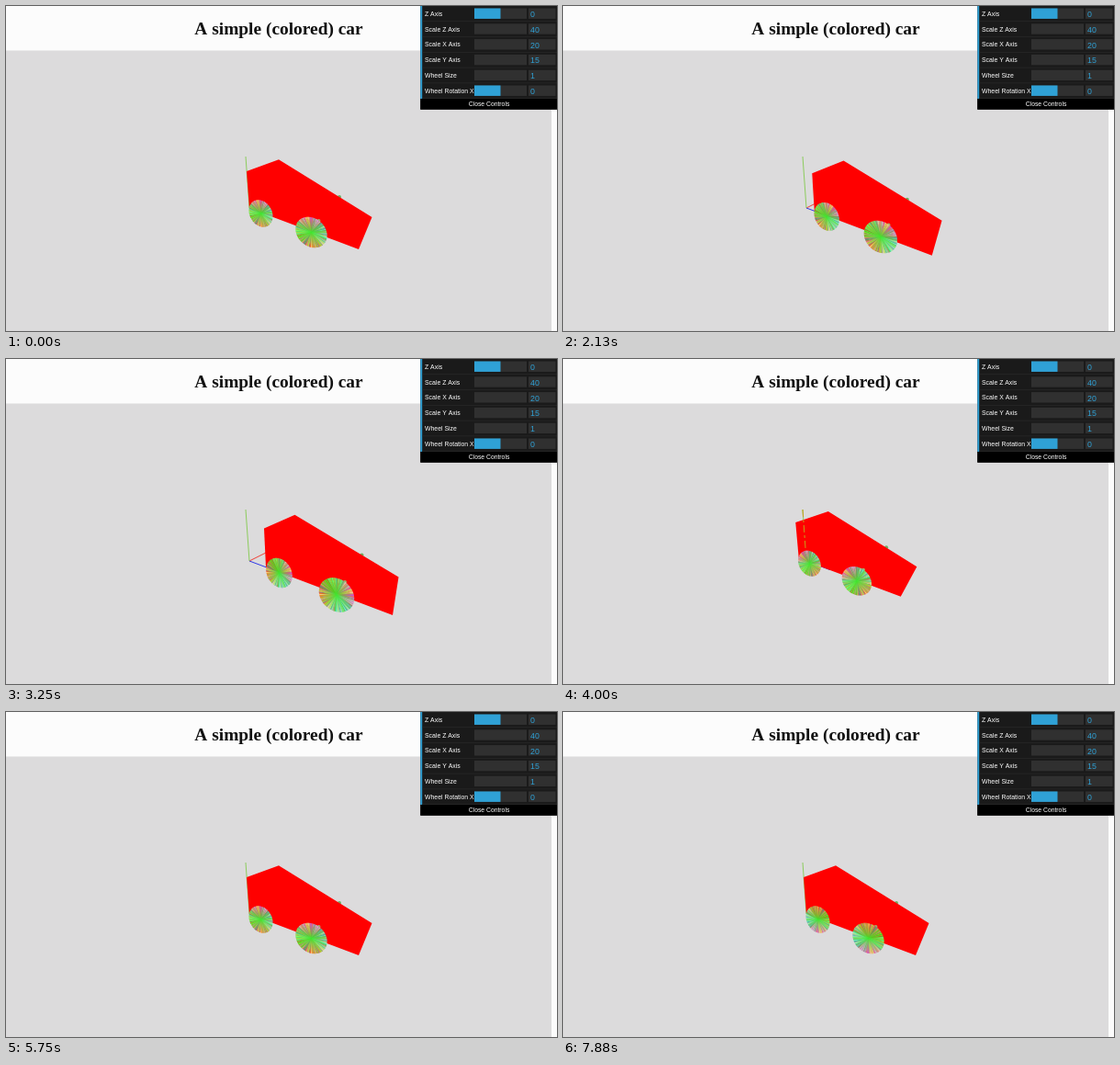
Write an HTML page with a canvas that moves like this. It is 600 px wide and 354 px high and loops after 8 s.

```html
<!DOCTYPE html>
<html lang="en">
<head>
<meta charset="utf-8">
<title>A simple (colored) car</title>
<style>
html, body { margin: 0; width: 100%; height: 100%; overflow: hidden; background: #fcfcfc; }
canvas { display: block; width: 600px; height: 354px; }
</style>
</head>
<body>
<canvas id="stage"></canvas>
<script>
const LOOP = 8000;
const canvas = document.getElementById('stage');
const ctx = canvas.getContext('2d');
const dpr = window.devicePixelRatio || 1;
canvas.width = 600 * dpr;
canvas.height = 354 * dpr;
ctx.scale(dpr, dpr);

// [time, position of the car along the blue axis]
const MOVES = [[0, 0], [1880, 1], [2380, 2], [2880, 3], [3250, 2], [3500, 1],
  [3750, 0], [4000, -1], [4250, -2], [4500, -3], [4880, -2], [5250, -1], [5630, 0]];

// Each point: x, y at positions -2, 0 and 2
const BODY = [
  [245, 176, 262, 180, 281, 184.5],
  [281, 164.7, 297, 167.2, 314.5, 169.8],
  [373, 222.5, 398.5, 230, 427.5, 237.5],
  [353, 253, 384, 265, 421, 279],
  [249, 214.2, 265, 220.2, 283, 226.7]
];
const WHEELS = [
  { path: [260, 219.5, 277.5, 226, 297.5, 233], a: 15.5, b: 12, tilt: 60, grow: 0.05 },
  { path: [308, 237.5, 332.5, 246.5, 360, 257], a: 18.7, b: 15, tilt: 42, grow: 0.06 }
];
const FAR_WHEEL = [342, 202.5, 363, 208, 387.5, 213.5];
const HUB = [314, 225.5, 340.5, 234, 369, 243];

const ROWS = [['Z Axis', '0', 0.5], ['Scale Z Axis', '40', 0], ['Scale X Axis', '20', 0],
  ['Scale Y Axis', '15', 0], ['Wheel Size', '1', 0], ['Wheel Rotation X', '0', 0.5]];

const SPOKES = makeSpokes(96);

// Random spokes over broad lobes: green at the sides, red and pink between
function makeSpokes(count) {
  let seed = 17;
  const noise = () => ((seed = (seed * 16807) % 2147483647) / 2147483647 - 0.5) * 120;
  return Array.from({ length: count }, (_, i) => {
    const angle = i / count * Math.PI * 2;
    const r = 168 + 55 * Math.cos(2 * (angle - 1.4)) + noise();
    const g = 185 + 45 * Math.cos(2 * angle) + noise();
    const b = 125 + 40 * Math.cos(angle + 1) + noise();
    return `rgb(${r | 0},${g | 0},${b | 0})`;
  });
}

function place([x0, y0, x1, y1, x2, y2], k) {
  const curve = (p, q, r) => q + (r - p) / 4 * k + (r + p - 2 * q) / 8 * k * k;
  return [curve(x0, x1, x2), curve(y0, y1, y2)];
}

function line(x0, y0, x1, y1, color, dash = []) {
  ctx.strokeStyle = color;
  ctx.lineWidth = 1;
  ctx.setLineDash(dash);
  ctx.beginPath();
  ctx.moveTo(x0, y0);
  ctx.lineTo(x1, y1);
  ctx.stroke();
  ctx.setLineDash([]);
}

function rect(x, y, w, h, color) {
  ctx.fillStyle = color;
  ctx.fillRect(x, y, w, h);
}

function text(str, x, y, font, color, align = 'left') {
  ctx.font = font;
  ctx.fillStyle = color;
  ctx.textAlign = align;
  ctx.fillText(str, x, y);
}

function dot([x, y], r, color) {
  ctx.fillStyle = color;
  ctx.beginPath();
  ctx.arc(x, y, r, 0, Math.PI * 2);
  ctx.fill();
}

function drawWheel(wheel, k, spin) {
  const [x, y] = place(wheel.path, k);
  const size = 1 + wheel.grow * k;
  const tilt = wheel.tilt * Math.PI / 180;
  const step = Math.PI * 2 / SPOKES.length;
  ctx.save();
  ctx.translate(x, y);
  ctx.rotate(tilt);
  ctx.scale(wheel.a * size, wheel.b * size);
  ctx.rotate(spin - tilt);
  SPOKES.forEach((color, i) => {
    ctx.fillStyle = color;
    ctx.beginPath();
    ctx.moveTo(0, 0);
    ctx.arc(0, 0, 1, i * step, (i + 1.3) * step);
    ctx.fill();
  });
  const glow = ctx.createRadialGradient(0, 0, 0, 0, 0, 1);
  glow.addColorStop(0, 'rgba(50,235,35,0.9)');
  glow.addColorStop(0.4, 'rgba(50,235,35,0.45)');
  glow.addColorStop(1, 'rgba(50,235,35,0)');
  ctx.fillStyle = glow;
  ctx.beginPath();
  ctx.arc(0, 0, 1, 0, Math.PI * 2);
  ctx.fill();
  ctx.restore();
}

function drawCar(k, spin) {
  line(265, 220, 300, 202.5, '#f04038');
  line(265, 220, 291, 229.7, '#3038e8');
  line(261, 164, 265, 220, '#8ccc5c');
  dot(place(FAR_WHEEL, k), 2, '#6fae62');

  ctx.fillStyle = '#ff0000';
  ctx.beginPath();
  BODY.forEach(p => ctx.lineTo(...place(p, k)));
  ctx.fill();

  if (k < 0) line(261, 164, 264.3, 210, '#c8a018', [8, 3, 3, 3]);
  dot(place(HUB, k), 2, '#a8a868');
  WHEELS.forEach(w => drawWheel(w, k, spin));
}

function drawPanel() {
  const sans = '"Liberation Sans", Arial, sans-serif';
  rect(451.3, 0, 148.7, 112.7, '#1a1a1a');
  rect(451.3, 0, 1.9, 101, '#2fa1d6');
  ROWS.forEach(([label, value, fill], i) => {
    const y = i * 16.8 + 0.2;
    rect(453.2, y + 16.2, 147, 0.6, '#2c2c2c');
    rect(510, y + 2.3, 57, 11.4, '#303030');
    rect(510, y + 2.3, 57 * fill, 11.4, '#2fa1d6');
    rect(569, y + 2.3, 29.5, 11.4, '#303030');
    text(label, 456, y + 10.6, '6.9px ' + sans, '#fff');
    text(value, 571, y + 11.7, '8.8px ' + sans, '#2fa1d6');
  });
  rect(451.3, 101, 148.7, 11.7, '#000');
  text('Close Controls', 526, 109.4, '6.8px ' + sans, '#fff', 'center');
}

function spinAt(t, k) {
  const run = (from, to) => Math.max(0, Math.min(t, to) - from);
  const turning = run(6375, 6880) + run(7005, 7880);
  return k * 0.7 + Math.floor(turning / 125) * 0.29;
}

function draw(t) {
  const k = MOVES.filter(([start]) => start <= t).pop()[1];
  rect(0, 0, 600, 354, '#fcfcfc');
  rect(0, 48.5, 594, 305.5, '#dcdbdc');
  text('A simple (colored) car', 297, 30.5,
    'bold 19.4px "Liberation Serif", "Times New Roman", serif', '#111', 'center');
  drawCar(k, spinAt(t, k));
  drawPanel();
}

const start = performance.now();
function tick() {
  draw((performance.now() - start) % LOOP);
  requestAnimationFrame(tick);
}
tick();
</script>
</body>
</html>
```
